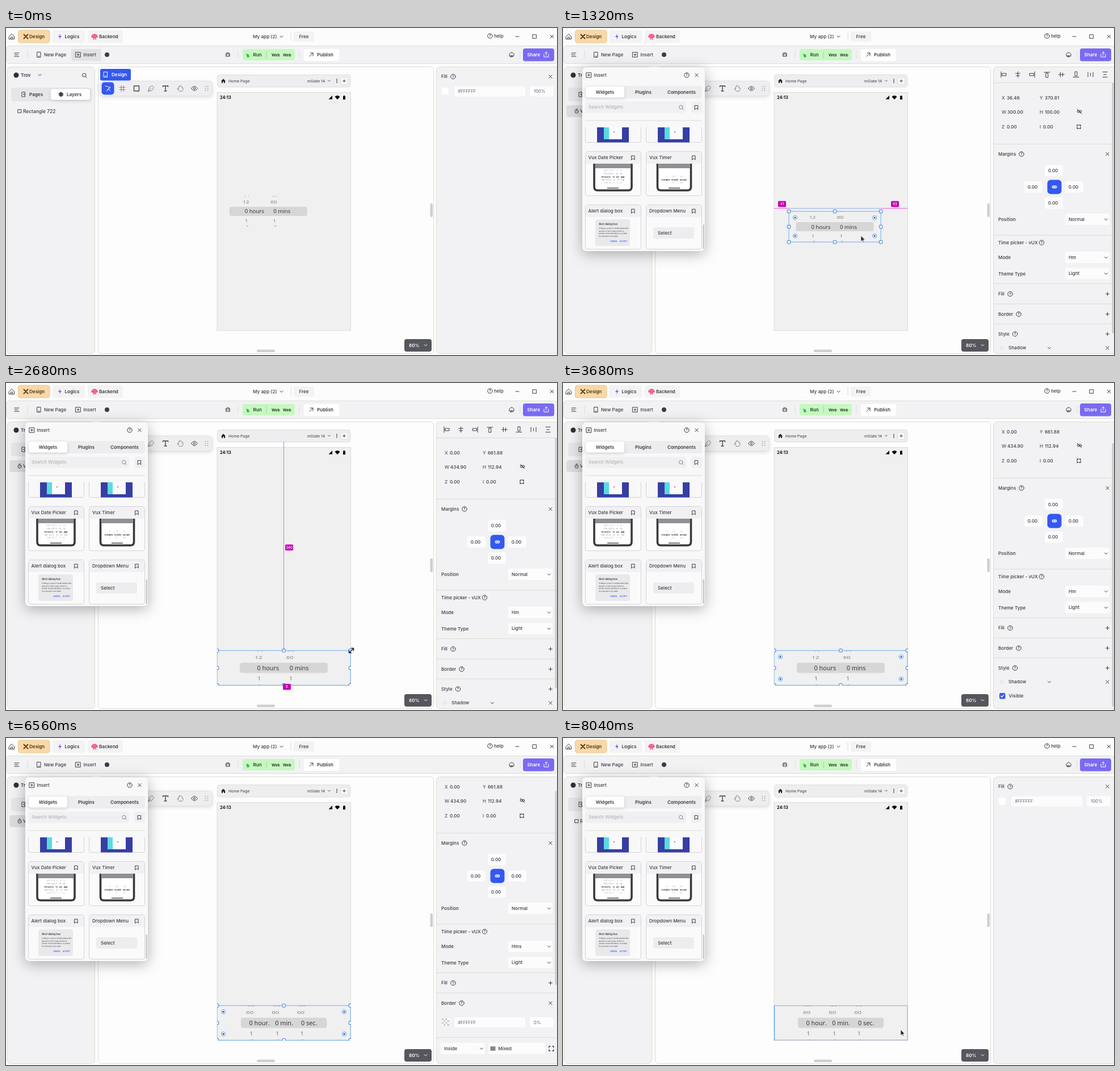
Write an HTML page that moves like this. It is 971 by 576 pixels and loops after 8080 ms.

```html
<!DOCTYPE html>
<html lang="en">
<head>
<meta charset="utf-8">
<title>App builder</title>
<style>
  html, body { margin: 0; width: 100%; height: 100%; overflow: hidden; background: #fcfcfc; }
  svg { display: block; }
  #stage { width: 971px; height: 576px; }
  text { font-family: Inter, sans-serif; white-space: pre; }
  .wheel text { font-family: "Open Sans", "Noto Sans", sans-serif; }
  .float { filter: drop-shadow(0 5px 12px rgba(0, 0, 0, .3)); }
  .soft { filter: drop-shadow(0 2px 3px rgba(0, 0, 0, .13)); }
</style>
</head>
<body>
<svg id="stage" viewBox="0 0 971 576"></svg>
<script>
const LOOP = 8080, STEP = 40;
const UNIT = 235 / 434.9, LEFT = 372, TOP = 113.6;
const INK = '#3c3c42', BLUE = '#3458f0', PINK = '#c800b4', EDGE = '#dddcd4', PANEL = '#f2f2f4';
const stage = document.getElementById('stage');

function set(node, attrs) {
  for (const k in attrs) node.setAttribute(k, attrs[k]);
  return node;
}
function add(parent, tag, attrs, content) {
  const node = set(document.createElementNS('http://www.w3.org/2000/svg', tag), attrs);
  if (content !== undefined) node.textContent = content;
  parent.appendChild(node);
  return node;
}
const group = (p, attrs = {}) => add(p, 'g', attrs);
const box = (p, x, y, w, h, fill, r = 0, more = {}) =>
  add(p, 'rect', { x, y, width: w, height: h, fill, rx: r, ...more });
// y is the middle of the line of text
const label = (p, x, y, str, size = 8.1, fill = INK, weight = 500, more = {}) =>
  add(p, 'text', { x, y: y + size * .36, 'font-size': size, fill, 'font-weight': weight, ...more }, str);
const mid = { 'text-anchor': 'middle' };
const icon = (p, x, y, d, stroke = INK, more = {}) => add(p, 'path', {
  d, transform: `translate(${x} ${y})`, fill: 'none', stroke,
  'stroke-width': 1, 'stroke-linecap': 'round', 'stroke-linejoin': 'round', ...more });
const rule = (p, x1, y1, x2, y2, stroke = EDGE, w = 1) =>
  add(p, 'line', { x1, y1, x2, y2, stroke, 'stroke-width': w });
const show = (node, on) => node.setAttribute('display', on ? 'inline' : 'none');

const D = {
  chevron: 'M-2.5-1L0 1.5 2.5-1',
  close: 'M-2.7-2.7L2.7 2.7M2.7-2.7L-2.7 2.7',
  plus: 'M-3 0H3M0-3V3',
  search: 'M3 0A3.2 3.2 0 1 1-3.4 0A3.2 3.2 0 1 1 3 0M2.2 2.4L4.3 4.5',
  ring: 'M4.2 0A4.2 4.2 0 1 1-4.2 0A4.2 4.2 0 1 1 4.2 0',
  page: 'M-3-4.5H3V4.5H-3ZM-1 2.7H1',
  insert: 'M-4.2-4.2H4.2V4.2H-4.2ZM-2 0H2M0-2V2',
  mark: 'M-2.6-3.4H2.6V3.6L0 1.4-2.6 3.6Z',
  home: 'M-4.5 0L0-4.5 4.5 0V4.5H-4.5ZM-1.5 4.5V1H1.5V4.5',
  arrow: 'M0 0V10L2.5 7.8 4 11 5.5 10.2 4 7.2 7 7Z',
  link: 'M-.5-1.8H-2A1.8 1.8 0 0 0-2 1.8H-.5M.5-1.8H2A1.8 1.8 0 0 1 2 1.8H.5M-1.5 0H1.5'
};
function help(p, x, y) {
  icon(p, x, y, D.ring);
  label(p, x, y, '?', 6.5, INK, 600, mid);
}

function drawHeader(p) {
  icon(p, 10, 15, D.home);
  box(p, 21.5, 4, 55.5, 22, '#f9d8a8', 4, { stroke: '#ecc78c' });
  icon(p, 35, 15, 'M-3.5-3.5L3.5 3.5M3.5-3.5L-3.5 3.5', '#5c3c10', { 'stroke-width': 2 });
  label(p, 41, 15, 'Design', 8.1, '#4a3414', 600);
  box(p, 82, 4, 57, 22, '#f3f3f3', 4);
  icon(p, 95, 15, 'M1-5L-3 1H0L-1 5 3-1H0Z', 'none', { fill: '#7560f5' });
  label(p, 103.5, 15, 'Logics', 8.1, INK, 600);
  box(p, 144, 4, 62, 22, '#f3f3f3', 4);
  icon(p, 156, 15, 'M-5 1A5 5 0 0 1 5 1ZM-2 1V5M2 1V5M0 1V4', '#ea4f86', { fill: '#f56d9b', 'stroke-width': 1.4 });
  label(p, 164, 15, 'Backend', 8.1, INK, 600);
  label(p, 435, 15, 'My app (2)', 8.2);
  icon(p, 485.5, 15, D.chevron);
  rule(p, 502, 8, 502, 22);
  box(p, 507, 6, 36, 18, '#f3f3f3', 3);
  label(p, 525, 15, 'Free', 8.1, INK, 500, mid);
  help(p, 853, 14);
  label(p, 860, 14, 'help');
  icon(p, 901, 15, 'M-3 0H3');
  icon(p, 931.5, 15, 'M-3.2-3.2H3.2V3.2H-3.2Z');
  icon(p, 962, 15, D.close);
}

function drawToolbar(p) {
  box(p, .5, 31.5, 972, 31, PANEL, 6, { stroke: EDGE });
  icon(p, 19, 47, 'M-4-3H4M-4 0H2M-4 3H4');
  rule(p, 38, 40, 38, 54);
  insertHover = box(p, 115, 37, 53, 21, '#e2e2e4', 3);
  icon(p, 58, 47, D.page);
  label(p, 67, 47, 'New Page');
  icon(p, 127, 47, D.insert);
  label(p, 136.5, 47, 'Insert');
  add(p, 'circle', { cx: 178, cy: 47, r: 4, fill: INK });
  icon(p, 391, 47, 'M-2.5-2.5H2.5V3H-2.5ZM-4-1H-2.5M-4 2H-2.5M2.5-1H4M2.5 2H4M-1.5-4L-.5-2.5M1.5-4L.5-2.5M-1 0H1');
  rule(p, 409, 40, 409, 54);
  box(p, 417, 37, 92, 20, '#c6f8c0', 4);
  icon(p, 426, 48, 'M-3-3L2-1 3 3-1 4Z', 'none', { fill: '#3fb655' });
  label(p, 435.5, 47, 'Run', 8.1, '#24442a', 600);
  rule(p, 459, 41, 459, 53, '#9fdc9c');
  label(p, 468, 47.5, 'Web', 6.7, '#222', 600);
  label(p, 488, 47.5, 'Web', 6.7, '#222', 600);
  rule(p, 517, 40, 517, 54);
  box(p, 525, 37, 62, 21, '#fff', 3);
  icon(p, 538, 47, 'M-3 3L3-3M-2-3H3V2');
  label(p, 548, 47, 'Publish', 8.1, INK, 600);
  icon(p, 891, 47, 'M-4 2A4.3 4.3 0 1 1 4 2ZM-2 2V4H0V1M2 2V4');
  rule(p, 906, 40, 906, 54);
  box(p, 911, 36, 55, 22.5, '#7a6af2', 4);
  label(p, 918.5, 47, 'Share', 8.1, '#fff', 600);
  icon(p, 952, 47, 'M-4-1V4H4V-1M0 1V-5M-2-3L0-5 2-3', '#fff');
}

function drawLeft(p) {
  box(p, 2.5, 68.5, 154, 505, PANEL, 6, { stroke: EDGE });
  add(p, 'circle', { cx: 18, cy: 83, r: 4.5, fill: '#2f2f34' });
  label(p, 26, 83, 'Trov', 8.1, INK, 600);
  icon(p, 59.5, 82.5, D.chevron);
  icon(p, 138, 83, D.search);
  box(p, 9, 105, 142, 24, '#e6e6e8', 4);
  icon(p, 31, 117, 'M2.5-2V-4H-3V4H2.5V2M3.5 0H0M1.5-1.5L0 0 1.5 1.5');
  label(p, 41, 117, 'Pages', 8.1, INK, 600);
  box(p, 79, 107.5, 69, 19, '#fff', 4, { class: 'soft' });
  icon(p, 97, 117, 'M0-4L4-1 0 2-4-1ZM-4 1L0 4 4 1', INK, { fill: INK });
  label(p, 107, 117, 'Layers', 8.1, INK, 600);
  rectRow = group(p);
  icon(rectRow, 24, 146.5, 'M-2.8-2.8H2.8V2.8H-2.8Z');
  label(rectRow, 30, 146.5, 'Rectangle 722', 8.4);
  timerRow = group(p);
  box(timerRow, 6, 136, 145, 21, '#dcdcde', 4);
  icon(timerRow, 24, 147, 'M3 0A3 3 0 1 1-3 0A3 3 0 1 1 3 0M0 0V-1.5M-1-4.3H1');
  label(timerRow, 30, 146.5, 'Vux Timer');
}

function drawCanvas(p) {
  box(p, 162.5, 68.5, 591, 505, '#fdfdfd', 6, { stroke: EDGE });
  box(p, 166, 72, 54, 20.5, BLUE, 3);
  icon(p, 175.5, 82, D.page, '#fff');
  label(p, 186, 82, 'Design', 8.1, '#fff', 600);
  box(p, 166, 93.5, 197, 26, '#eeeef0', 5, { class: 'soft', stroke: '#e2e2de' });
  box(p, 168.5, 95.5, 22, 22, BLUE, 5);
  icon(p, 179.5, 106.5, 'M-4.5-4.5L4.5-1.5 1 .5 4 4M1 .5L-1.5 4.5Z', '#fff');
  const tools = ['M-2-5V5M2-5V5M-5-2H5M-5 2H5', 'M-4.5-4.5H4.5V4.5H-4.5Z',
    'M-5 5L-3-2 2-5 5-2 2 3ZM-5 5L0 0', 'M-4.5-3V-4.5H4.5V-3M0-4.5V4.5M-2 4.5H2',
    'M-3 1V-3Q-2-4-1-3V-5Q0-6 1-4V-4Q2-5 3-3V-1Q5-2 5 0V2Q4 5 1 5H-1L-5 1Q-5-1-3 1',
    'M-5.5 0Q0-8 5.5 0Q0 8-5.5 0M1.7 0A1.7 1.7 0 1 1-1.7 0A1.7 1.7 0 1 1 1.7 0'];
  [205, 230, 255.5, 281, 307, 332].forEach((x, i) =>
    icon(p, x, 106.5, tools[i], i % 2 || i > 4 ? '#44444a' : '#85858a', { 'stroke-width': i == 3 || i == 1 ? 1.4 : 1 }));
  for (let i = 0; i < 6; i++) add(p, 'circle', { cx: 351.5 + i % 2 * 4, cy: 103 + (i >> 1) * 3.5, r: .9, fill: '#aaa' });

  box(p, 372.5, 82.5, 234.5, 21.5, '#eeeef0', 4, { stroke: '#dededa' });
  icon(p, 383, 93.5, 'M-4 0L0-4 4 0H3V3.5H1V1H-1V3.5H-3V0Z', 'none', { fill: '#222' });
  label(p, 392, 93.3, 'Home Page', 6.8, '#55555a');
  label(p, 531, 93.3, 'mSlate 14', 6.8, '#55555a');
  icon(p, 569.5, 93, 'M-2-1L0 1 2-1', '#55555a');
  for (let i = -1; i < 2; i++) add(p, 'circle', { cx: 583, cy: 93 + i * 2.7, r: .9, fill: '#333' });
  box(p, 589.5, 87, 13, 12.5, '#f9f9fa', 2, { stroke: '#dcdcdc' });
  icon(p, 596, 93.2, 'M-2.3 0H2.3M0-2.3V2.3');
  box(p, 372, 113.5, 235.5, 419.5, '#f0f0f0', 0, { stroke: '#dcdcd8' });
  label(p, 377, 122, '24:13', 7.3, '#111', 700);
  icon(p, 572, 122.5, 'M-3.5 3H3V-3.5Z', 'none', { fill: '#000' });
  icon(p, 584, 122.5, 'M-4.5-1.5Q0-5.5 4.5-1.5L0 3.5Z', 'none', { fill: '#000' });
  icon(p, 596, 122.5, 'M-2-2.5H-1V-3.5H1V-2.5H2V3.5H-2Z', 'none', { fill: '#000' });
  box(p, 747.5, 309, 4.5, 24, '#cfcfd1', 2);
  box(p, 442, 566.5, 32, 4.5, '#cfcfd1', 2);
}

// [x, text] rows: middle, previous, next, and the clipped ones
const WHEELS = {
  Hm: { half: 68.5, main: [[-24.5, '0 hours'], [24, '0 mins']],
    far: [[-39.5, '12', '1', '11', 1], [9.5, '60', '1', '59', 1.5]] },
  Hms: { half: 67, main: [[-38, '0 hour.'], [.5, '0 min.'], [39.5, '0 sec.']],
    far: [[-53, '60', '1', '59', 2.5], [-13, '60', '1', '59', 3], [26.5, '60', '1', '59', 2]] }
};
function drawWheel(p, w) {
  const g = group(p, { class: 'wheel' });
  const band = box(g, -w.half, -8, w.half * 2, 16, '#d6d6d7', 3.5);
  const texts = group(g);
  for (const [x, str] of w.main) label(texts, x, 0, str, 9.65, 'inherit', 400, mid);
  const flat = (x, y, str, sy) => label(texts, 0, 0, str, 9.4, 'inherit', 400,
    { ...mid, transform: `translate(${x} ${y}) scale(1.08 ${sy})`, opacity: .6 });
  for (const [x, up, down, top, dx] of w.far) {
    flat(x, -16.6, up, .72);
    flat(x + dx, 16.6, down, .78);
    flat(x + 1.5, -27, top, .4);
    flat(x + dx + 1, 26.8, '2', .4);
  }
  texts.querySelectorAll('text').forEach(n => n.removeAttribute('fill'));
  return { g, band, texts };
}

function tag(p) {
  const g = group(p);
  box(g, -7, -5, 14, 10.5, PINK, 1.5);
  const text = label(g, 0, 0, '', 6, '#fff', 500, mid);
  return (x, y, value) => {
    set(g, { transform: `translate(${x} ${y})` });
    text.textContent = value;
  };
}

function drawInsert(p) {
  box(p, 34, 69, 216, 324, '#f8f8f9', 7, { class: 'float' });
  icon(p, 45.5, 83, D.insert);
  label(p, 54.5, 83, 'Insert');
  help(p, 218, 83);
  icon(p, 235.5, 83, D.close);
  box(p, 39, 102, 206, 22, '#ededef', 4);
  box(p, 40, 103, 68, 19.5, '#fff', 4, { class: 'soft' });
  label(p, 74, 113, 'Widgets', 8.1, INK, 600, mid);
  label(p, 141.5, 113, 'Plugins', 8.1, INK, 600, mid);
  label(p, 209, 113, 'Components', 8.1, INK, 600, mid);
  box(p, 39, 130, 178, 19.5, '#f0f0f2', 4);
  label(p, 45, 139.5, 'Search Widgets', 8.1, '#b4b4ba');
  icon(p, 208, 139.5, D.search, '#85858a');
  box(p, 226, 130, 19, 19.5, '#f0f0f2', 4);
  icon(p, 235, 140, D.mark);
  rule(p, 39, 163, 245, 163, EDGE);

  for (const x of [0, 107]) {
    const g = group(p, { transform: `translate(${x} 0)` });
    icon(g, 0, 0, 'M39.5 175V199Q39.5 201.5 42 201.5H135Q137.5 201.5 137.5 199V175', '#d4d4da');
    box(g, 60, 175, 56, 26.5, '#363ea4');
    box(g, 72, 175, 9, 21, '#58dbe0');
    box(g, 81, 175, 23, 21, '#fbfbfd');
    box(g, 89, 182, 2, 2, '#c2385c', 1);
    for (const y of [217.5, 311.5]) {
      box(g, 39.5, y, 98, 78, '#fafafa', 4, { stroke: '#d4d4da' });
      box(g, 40, y + .5, 97, 21, '#f1f1f3', 3);
      icon(g, 123.5, y + 11, D.mark);
    }
  }
  label(p, 44.5, 228.5, 'Vux Date Picker');
  label(p, 152, 228.5, 'Vux Timer');
  label(p, 44.5, 322.5, 'Alert dialog box');
  label(p, 152, 322.5, 'Dropdown Menu');

  const phone = (x, w, rows) => {
    icon(p, x, 239, `M2 0V41Q2 47 8 47H${w - 8}Q${w - 2} 47 ${w - 2} 41V0`, '#39393b',
      { 'stroke-width': 3.6, 'stroke-linecap': 'butt', fill: '#fff' });
    box(p, x + 4, 239, w - 8, 8, '#8f8f94');
    rule(p, x + w / 2 - 10, 282, x + w / 2 + 10, 282, '#222', 1.2);
    rows.forEach(([y, str, op], i) => label(p, x + w / 2, y, str, 3.9, '#222', op == 1 ? 600 : 400, { ...mid, opacity: op }));
  };
  phone(53, 70, [[251, 'Wed Oct 3    9   18', .3], [257, 'Thu Oct 4   10   19', .45],
    [263, 'Fri Oct 5    11   20   AM', 1], [268, 'Sat Oct 6   12   21   PM', .45], [273, 'Sun Oct 7    1   22', .3]]);
  phone(164.5, 63, [[262, '11        59        59', .3], [267.5, '0 hours   10 min   28 sec', 1], [273, '1         11         29', .3]]);

  box(p, 57, 337, 61, 47, '#e9e9ec', 4);
  label(p, 63, 345, 'Alert dialog box', 4.4, '#222');
  ['A dialog is a type of modal window that', 'appears in front of app content to', 'provide critical information, or prompt', 'for a decision to be made.']
    .forEach((s, i) => label(p, 63, 353 + i * 4.6, s, 2.8, '#444', 400));
  label(p, 83, 376, 'CANCEL', 3.2, BLUE, 600);
  label(p, 100, 376, 'ACCEPT', 3.2, BLUE, 600);
  box(p, 159, 351, 72, 20, '#ededef', 4);
  label(p, 167, 361, 'Select', 8.2);
  box(p, 246.5, 346, 2.5, 43, '#c9c9cc', 1.2);
}

function section(p, y, title, mark = D.plus) {
  label(p, 767, y, title);
  const width = { Fill: 788, Border: 803, Style: 796.5, Margins: 808 }[title];
  help(p, width, y);
  return icon(p, 959.5, y, mark);
}
function select(p, x, y, w, str) {
  box(p, x, y - 10, w, 20, '#fcfcfd', 3);
  icon(p, x + w - 6, y, D.chevron);
  return label(p, x + 6, y, str);
}
function colour(p, y, amount) {
  box(p, 790, y - 9, 125, 18, '#fcfcfd', 3);
  label(p, 796.5, y, '#FFFFFF', 7.6, '#66666c', 400);
  box(p, 923, y - 9, 42, 18, '#fcfcfd', 3);
  label(p, 930, y, amount, 7.8, '#66666c', 400);
}

function drawProps(p) {
  const aligns = ['M-4-5V5M-2-2H5V2H-2Z', 'M0-5V5M-4-2H4M-3 2H3', 'M4-5V5M2-2H-5V2H2Z', 'M-5-4H5M-2-2V5H2V-2Z',
    'M-5 0H5M-2-4V4M2-3V3', 'M-5 4.5H5M-2 2V-5H2V2Z', 'M-4.5-4V4M4.5-4V4M0-2.5V2.5', 'M-4-4.5H4M-4 4.5H4M-2.5 0H2.5'];
  aligns.forEach((d, i) => icon(p, 776 + i * 25.6, 82, d));
  for (const y of [96.5, 204.5, 365, 450.5]) rule(p, 759, y, 968, y, EDGE, 1.2);
  ['X', 'Y', 'W', 'H', 'Z', 'I'].forEach((name, i) => {
    const x = i % 2 ? 840 : 773, y = [123, 148.5, 174][i >> 1];
    label(p, x, y, name, 8.1, '#55555a');
    fields[name] = label(p, x + (name == 'W' ? 10 : name == 'I' ? 6 : 9), y, '0.00');
  });
  icon(p, 910, 147, D.link + 'M-4-4L4 4');
  icon(p, 909, 174, 'M-3-1V-3H-1M1-3H3V-1M3 1V3H1M-1 3H-3V1', INK, { 'stroke-width': 1.3 });
  section(p, 222, 'Margins', D.close);
  for (const [x, y] of [[865, 251], [829, 280], [901, 280], [865, 308.5]]) {
    box(p, x - 16, y - 10, 32, 20, '#fcfcfd', 4);
    label(p, x - 1.5, y, '0.00', 8.1, INK, 500, mid);
  }
  box(p, 853.5, 267.5, 25, 25, BLUE, 6);
  icon(p, 866, 280, D.link, '#fff', { 'stroke-width': 1.3 });
  label(p, 767, 337, 'Position');
  select(p, 885, 337, 78, 'Normal');
  label(p, 767, 378, 'Time picker - vUX');
  help(p, 843.5, 378);
  label(p, 767, 404.5, 'Mode');
  fields.mode = select(p, 885, 404, 78, 'Hm');
  label(p, 767, 433, 'Theme Type');
  fields.theme = select(p, 885, 432.5, 78, 'Light');
  section(p, 468.5, 'Fill');
  rule(p, 759, 486, 968, 486, EDGE, 1.2);
  borderMark = section(p, 504, 'Border');

  styleBlock = group(p);
  rule(styleBlock, 759, 521, 968, 521, EDGE, 1.2);
  section(styleBlock, 539, 'Style');
  icon(styleBlock, 773, 563.5, 'M2.5 0A2.5 2.5 0 1 1-2.5 0A2.5 2.5 0 1 1 2.5 0', '#c8c8cc', { 'stroke-dasharray': '1 2' });
  label(styleBlock, 785, 563.5, 'Shadow');
  icon(styleBlock, 857, 563.5, D.chevron);
  icon(styleBlock, 959.5, 563.5, D.close);
  box(styleBlock, 769, 583, 10.5, 10.5, BLUE, 2.5);
  icon(styleBlock, 774, 588.3, 'M-2.5 0L-.7 2 2.7-2', '#fff', { 'stroke-width': 1.3 });
  label(styleBlock, 785.5, 588.5, 'Visible');

  borderBlock = group(p);
  for (let i = 0; i < 16; i++)
    box(borderBlock, 768 + i % 4 * 3.2, 531 + (i >> 2) * 3.2, 3.2, 3.2, (i + (i >> 2)) % 2 ? '#fff' : '#c8c8cb');
  colour(borderBlock, 538, '0%');
  rule(borderBlock, 759, 564.5, 968, 564.5, EDGE, 1.2);
  select(borderBlock, 766, 584, 78, 'Inside');
  box(borderBlock, 850, 574, 100, 20, '#fcfcfd', 3);
  icon(borderBlock, 858, 584, 'M-4-2.5H4M-4 0H4M-4 2.5H4', INK, { 'stroke-width': 1.6 });
  label(borderBlock, 867.5, 584, 'Mixed');
  icon(borderBlock, 961, 584, 'M-4-2V-4H-2M2-4H4V-2M4 2V4H2M-2 4H-4V2', INK, { 'stroke-width': 1.3 });
}

function menu(p, y, items) {
  const g = group(p);
  box(g, 876, y, 105, 56, '#fefefe', 5, { class: 'soft' });
  items.forEach((s, i) => label(g, 886.5, y + 15.7 + i * 21.5, s));
  return g;
}

const fields = {};
let insertHover, rectRow, timerRow, borderMark, styleBlock, borderBlock;
const defs = add(stage, 'defs', {});
box(add(defs, 'clipPath', { id: 'phone' }), 372, 60, 236, 473, '#000');
box(add(defs, 'clipPath', { id: 'side' }), 759, 69, 212, 504, '#000');

drawHeader(stage);
drawToolbar(stage);
drawLeft(stage);
drawCanvas(stage);

const widget = add(stage, 'svg', { overflow: 'hidden' });
const face = group(widget);
const wheels = { Hm: drawWheel(face, WHEELS.Hm), Hms: drawWheel(face, WHEELS.Hms) };
const hover = group(stage);
box(hover, 372.5, 471.5, 234.5, 60.5, 'none', 0, { stroke: '#a2a6c4' });
rule(hover, 372.5, 471, 372.5, 532, '#4a9af5', 1.2);

const frame = group(stage, { 'clip-path': 'url(#phone)' });
const outline = box(frame, 0, 0, 1, 1, 'none', 0, { stroke: '#69aef5' });
const grips = [], dots = [];
for (let i = 0; i < 9; i++) {
  if (i != 4) grips.push([i % 3 / 2, Math.floor(i / 3) / 2, box(frame, -2.7, -2.7, 5.4, 5.4, '#fff', .5, { stroke: '#3b78d8' })]);
}
for (let i = 0; i < 4; i++) {
  const g = group(frame);
  add(g, 'circle', { r: 3.6, fill: '#fff', stroke: '#5b98ea' });
  add(g, 'circle', { r: 1.6, fill: '#2352b8' });
  dots.push([i % 2, i >> 1, g]);
}

const dragGuide = group(stage);
const dragLine = rule(dragGuide, 372, 0, 607, 0, '#ee5cd4');
const topLine = rule(dragGuide, 0, 0, 0, 0, '#8ee0e8', 1.2);
const leftTag = tag(dragGuide), rightTag = tag(dragGuide);
const sizeGuide = group(stage);
const sizeLine = rule(sizeGuide, 0, 103, 0, 0, '#c07bcb');
const gapTag = tag(sizeGuide), baseTag = tag(sizeGuide);

const zoom = group(stage);
box(zoom, 702, 548, 48, 22, '#56565d', 4);
label(zoom, 710, 559, '80%', 8.1, '#fff', 600);
icon(zoom, 739.5, 558.5, D.chevron, '#fff');

box(stage, 758.5, 68.5, 220, 505, PANEL, 6, { stroke: EDGE });
const pageProps = group(stage);
section(pageProps, 85.5, 'Fill', D.close);
box(pageProps, 767.5, 105, 12.5, 12.5, '#fff', 2);
colour(pageProps, 111.5, '100%');
const side = group(stage, { 'clip-path': 'url(#side)' });
const props = group(side);
drawProps(props);
const thumb = box(side, 967.5, 96, 3, 442, '#cacacd', 1.5);
const modeMenu = menu(stage, 351.5, ['Hm', 'Hms']);
const themeMenu = menu(stage, 380, ['Light', 'Dark']);
const insertPanel = group(stage);
drawInsert(insertPanel);

const pointer = icon(stage, 0, 0, D.arrow, '#fff', { fill: '#2a2a2e', 'stroke-width': .6 });
const resizer = icon(stage, 0, 0, 'M-3.5 3.5L3.5-3.5M0-4H4V0M-4 0V4H0', '#1d2c48', { 'stroke-width': 1.6 });

// time, x, y, w, h in design units
const POSE = [[960, 17.03, 337.4, 300, 100], [1000, 17.03, 342.94, 300, 100], [1320, 48.12, 387.53, 300, 100],
  [1720, 0, 674.82, 300, 100], [2000, 0, 674.82, 300, 100], [2600, 0, 661.88, 434.9, 112.94]];
const ENTER = [[560, 195, 230], [680, 195, 265], [960, 508, 342]];
const LEAVE = [[7360, 758, 470], [7600, 660, 440], [8040, 595, 514]];

function sample(keys, t) {
  if (t <= keys[0][0]) return keys[0].slice(1);
  for (let i = 1; i < keys.length; i++) {
    const a = keys[i - 1], b = keys[i];
    if (t <= b[0]) {
      const k = (t - a[0]) / (b[0] - a[0]);
      return a.slice(1).map((v, j) => v + (b[j + 1] - v) * k);
    }
  }
  return keys[keys.length - 1].slice(1);
}
const within = (t, a, b) => t >= a && t < b;
const toPx = ([x, y, w, h]) => [LEFT + x * UNIT, TOP + y * UNIT, w * UNIT, h * UNIT];

function render(t) {
  const opened = t >= 240, placed = t >= 960, chosen = within(t, 960, 7640);
  const dragging = within(t, 1000, 1760), sizing = within(t, 2000, 2800);
  const pose = sample(POSE, t), [x, y, w, h] = toPx(pose);

  show(insertHover, !opened);
  show(insertPanel, opened);
  show(rectRow, !chosen);
  show(timerRow, chosen);
  show(pageProps, !chosen);
  show(side, chosen);

  show(widget, placed);
  set(widget, { x, y, width: w, height: h });
  set(face, { transform: `translate(${w / 2} ${h / 2}) scale(${pose[3] / 100})` });
  const mode = t < 4240 ? 'Hm' : 'Hms', dark = within(t, 4720, 5400);
  for (const k in wheels) {
    show(wheels[k].g, k == mode);
    set(wheels[k].band, { fill: dark ? '#ededee' : '#d6d6d7' });
    set(wheels[k].texts, { fill: dark ? '#fff' : '#2b2b2d' });
  }

  show(frame, chosen);
  set(outline, { x, y, width: w, height: h });
  for (const [u, v, node] of grips) set(node, { transform: `translate(${x + u * w} ${y + v * h})` });
  for (const [u, v, node] of dots) {
    show(node, !sizing);
    set(node, { transform: `translate(${x + (u ? w - 11 : 11)} ${y + (v ? h - 11 : 11)})` });
  }

  show(dragGuide, dragging);
  const late = sample(POSE, t - 70), gy = toPx(late)[1];
  set(dragLine, { y1: gy, y2: gy });
  set(topLine, { x1: x, x2: x + w, y1: gy, y2: gy });
  leftTag((LEFT + x) / 2 + 1, gy - 8, Math.floor(late[0]));
  rightTag((x + w + 607) / 2 + 1.5, gy - 8, Math.floor(434.9 - late[0] - late[2]));
  show(sizeGuide, sizing);
  const cx = x + w / 2;
  set(sizeLine, { x1: cx, x2: cx, y2: y });
  gapTag(cx + 9.5, (103 + y) / 2 + 2.5, Math.round(pose[1] * .5137));
  baseTag(cx + 5.5, 535, 0);

  const shown = sample(POSE, dragging ? t - 120 : t);
  ['X', 'Y', 'W', 'H'].forEach((k, i) => fields[k].textContent = shown[i].toFixed(2));
  fields.mode.textContent = mode;
  fields.theme.textContent = dark ? 'Dark' : 'Light';
  const k = Math.min(1, Math.max(0, (t - 3000) / 320)), scroll = 37 * k * (2 - k);
  set(props, { transform: `translate(0 ${-scroll})` });
  const bordered = t >= 5960;
  set(borderMark, { d: bordered ? D.close : D.plus });
  show(borderBlock, bordered);
  show(styleBlock, !bordered);
  set(thumb, bordered ? { y: 93, height: 342 } : { y: 96 + scroll * .27, height: 442 + scroll * .6 });
  show(modeMenu, within(t, 3920, 4240));
  show(themeMenu, within(t, 4440, 4720) || within(t, 4960, 5400));

  let at = null;
  if (within(t, 560, 960)) at = sample(ENTER, t);
  else if (within(t, 960, 1880)) at = [x + 127, y + 43];
  else if (t >= 7360) at = sample(LEAVE, t);
  show(pointer, at);
  if (at) set(pointer, { transform: `translate(${at[0]} ${at[1]})` });
  show(resizer, within(t, 1880, 2880));
  set(resizer, { transform: `translate(${x + w + 1.5} ${y})` });
  show(hover, t >= 7840);
}

function tick() {
  render(Math.floor(performance.now() % LOOP / STEP) * STEP);
  requestAnimationFrame(tick);
}
tick();
</script>
</body>
</html>
```
